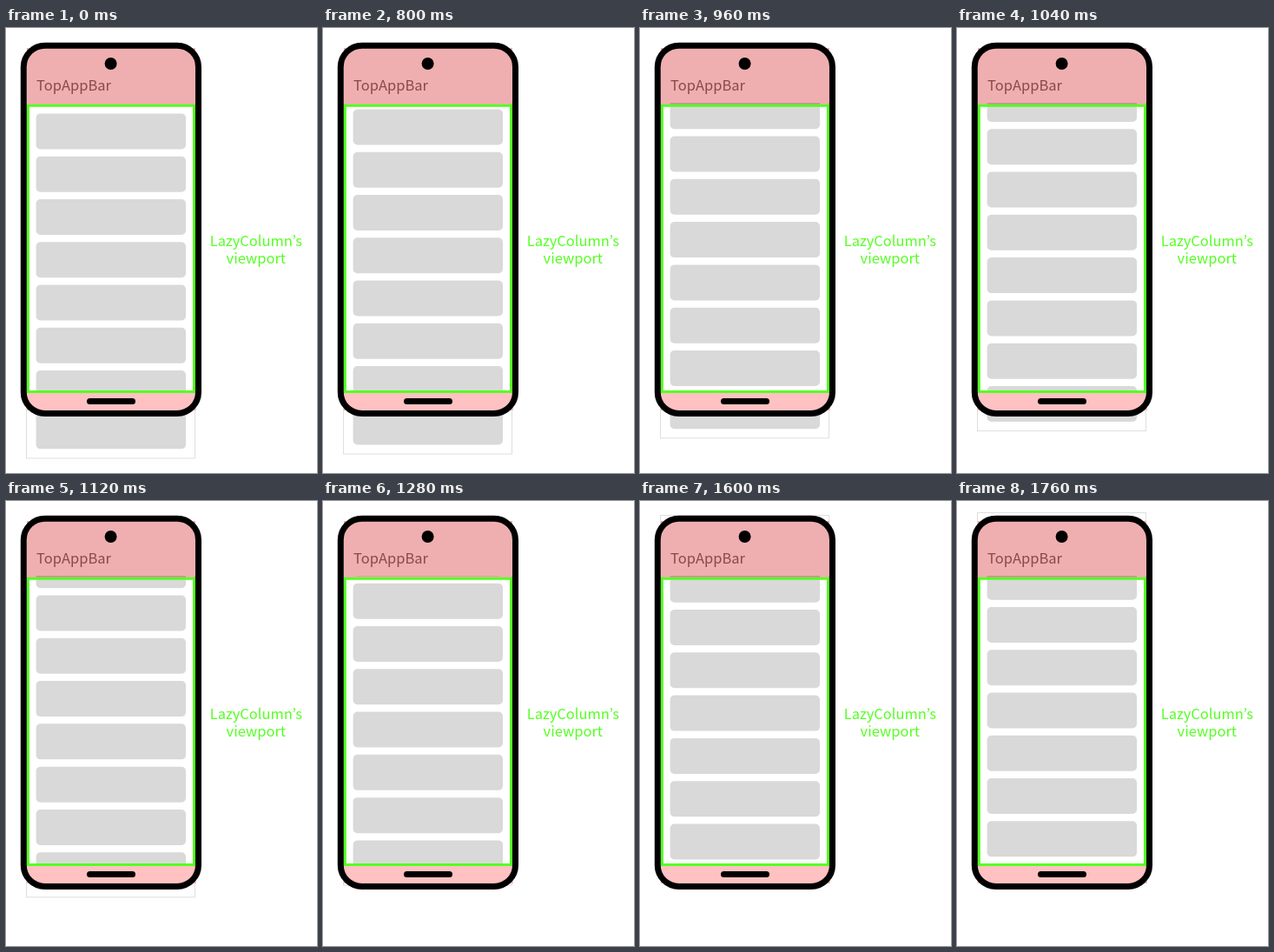
These frames come from a looping animation (358x512 px, 1880 ms). An HTML page with a canvas:

```html
<!DOCTYPE html>
<html lang="en">
<head>
<meta charset="utf-8">
<title>LazyColumn viewport</title>
<style>
  html, body { margin: 0; width: 100%; height: 100%; overflow: hidden; background: #fff; }
  canvas { display: block; }
</style>
</head>
<body>
<canvas id="stage" width="358" height="512"></canvas>
<script>
const ctx = document.getElementById('stage').getContext('2d');
const LOOP = 1880, STEP = 40, SCROLL_START = 800, STEPS = 25, SCROLL = 75;
const GREEN = '#55ff22', BAR = '#efafb0', NAV = '#ffc1c1';
const FONT = '16.5px "Noto Sans CJK JP", "Noto Sans CJK SC", "Noto Sans CJK", "Noto Sans", sans-serif';

function rounded(x, y, w, h, r) {
  ctx.beginPath();
  ctx.roundRect(x, y, w, h, r);
}

function rect(color, x, y, w, h) {
  ctx.fillStyle = color;
  ctx.fillRect(x, y, w, h);
}

function outline(color, width, x, y, w, h) {
  ctx.strokeStyle = color;
  ctx.lineWidth = width;
  ctx.strokeRect(x, y, w, h);
}

function label(text, color, align, x, y) {
  ctx.font = FONT;
  ctx.fillStyle = color;
  ctx.textAlign = align;
  ctx.fillText(text, x, y);
}

// Cubic Bezier ease-out with control points (0, 0) and (0.58, 1).
function easeOut(x) {
  let lo = 0, hi = 1;
  for (let i = 0; i < 30; i++) {
    const t = (lo + hi) / 2;
    if (1.74 * t * t - 0.74 * t ** 3 < x) lo = t; else hi = t;
  }
  return 3 * lo * lo - 2 * lo ** 3;
}

function scrollAt(time) {
  const step = Math.floor((time - SCROLL_START) / STEP) + 1;
  return SCROLL * easeOut(Math.min(STEPS, Math.max(0, step)) / STEPS);
}

function drawList(offset) {
  outline('#dedede', 1, 23.5, 88.5 - offset, 194, 406.5);
  ctx.fillStyle = '#d9d9d9';
  for (let i = 0; i < 8; i++) {
    rounded(34.6, 98.4 + i * 49.28 - offset, 172.4, 41, 5);
    ctx.fill();
  }
}

function drawPhone() {
  rect(BAR, 24, 23, 194, 63);
  // The lower edge of the app bar lets the cards show through.
  ctx.globalCompositeOperation = 'multiply';
  rect(BAR, 24, 86, 194, 2);
  ctx.globalCompositeOperation = 'source-over';
  rect(NAV, 23.5, 419, 195.5, 21);
  outline(GREEN, 3, 25.4, 89.3, 191.1, 329.2);

  ctx.strokeStyle = '#000';
  ctx.lineWidth = 7;
  rounded(20.3, 20.2, 201.2, 423.2, 24.5);
  ctx.stroke();

  ctx.fillStyle = '#000';
  ctx.beginPath();
  ctx.arc(120.6, 41, 7, 0, Math.PI * 2);
  ctx.fill();
  rounded(93, 426, 56, 7, 3.5);
  ctx.fill();
}

function draw(time) {
  rect('#fff', 0, 0, 358, 512);
  drawList(scrollAt(time));
  drawPhone();
  label('TopAppBar', '#8b4848', 'left', 35, 71.5);
  label('LazyColumn’s', GREEN, 'center', 287.8, 250.7);
  label('viewport', GREEN, 'center', 287.8, 270.7);
}

const start = performance.now();
function tick() {
  draw((performance.now() - start) % LOOP);
  requestAnimationFrame(tick);
}
tick();
</script>
</body>
</html>
```
